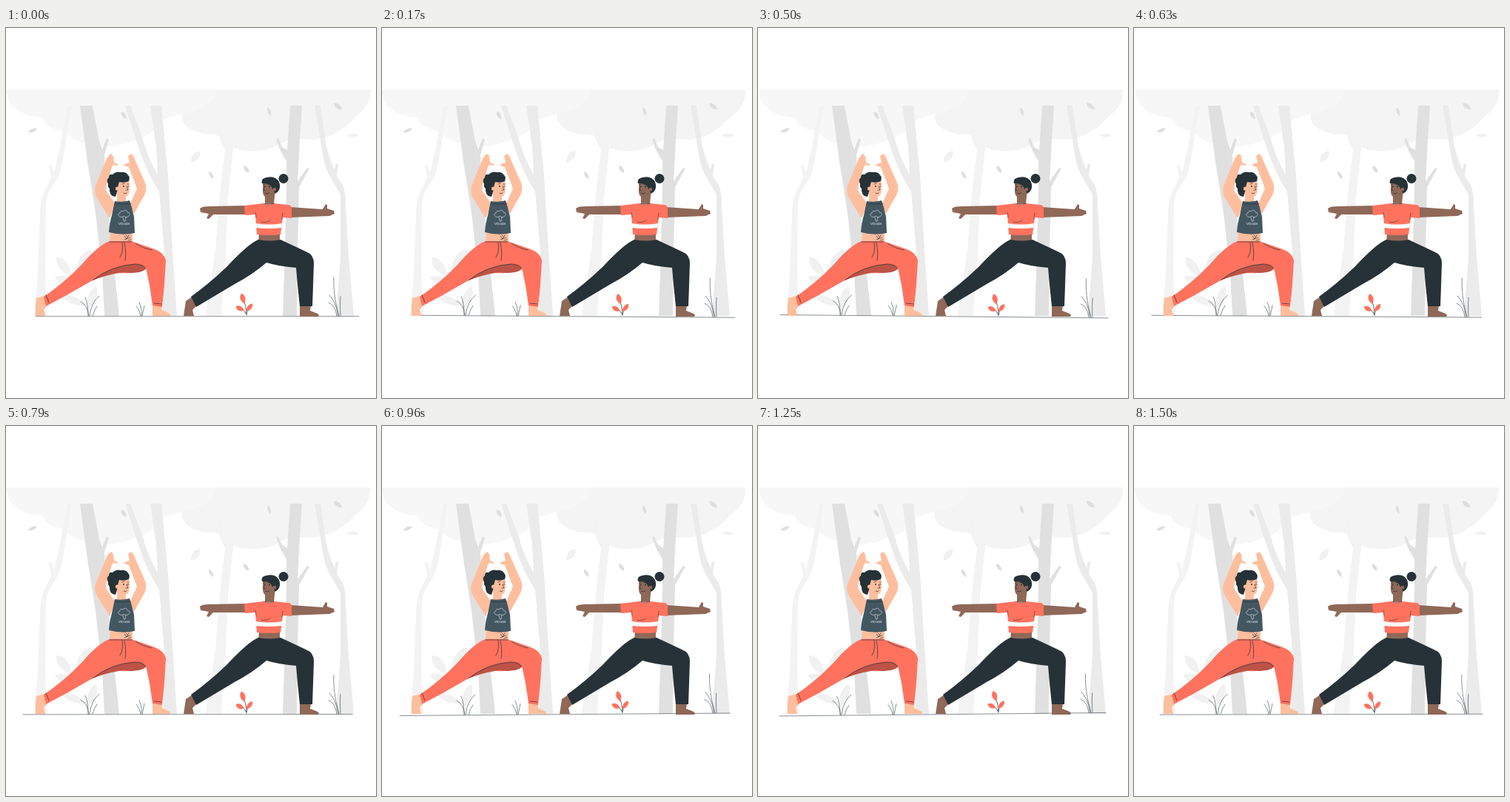
Animation, 500 px wide and 500 px high, one loop 1.54 s. Source, as an HTML page:

```html
<!DOCTYPE html>
<html lang="en">
<head>
<meta charset="utf-8">
<title>Yoga in the park</title>
<style>
html, body { margin: 0; width: 100%; height: 100%; overflow: hidden; background: #fff; }
svg { display: block; width: 100%; height: 100%; }
.ink { fill: none; stroke: #263238; stroke-width: .7; stroke-linecap: round; stroke-linejoin: round; }
.thin { stroke-width: .55; }
.dark { fill: #263238; }
.coral { fill: #ff725e; }
.fair { fill: #ffbe9d; }
.brown { fill: #8f6858; }
.t1 { fill: #e0e0e0; }
.t2 { fill: #ebebeb; }
.t3 { fill: #f3f3f3; }
</style>
</head>
<body>
<svg viewBox="0 0 500 500">
  <defs>
    <path id="leaf" d="M0-1C.95-.45.7.5 0 1C-.7.5-.95-.45 0-1Z"/>
  </defs>

  <g class="sway">
    <path fill="#f4f4f4" d="M270 83H492C493 97 487 109 473 119C466 126 461 133 451 138C435 151 412 152 395 150C380 149 374 155 364 160C345 169 313 169 301 157C294 149 290 145 278 144C257 144 238 134 237 120C237 110 247 106 258 101Z"/>
    <path fill="#f7f7f7" d="M0 83H283C286 93 273 105 257 111C242 116 219 119 210 126C203 137 191 147 172 152C151 162 119 163 104 155C90 152 83 144 76 139C61 137 51 130 49 121C35 121 19 116 12 108C4 104 1 93 0 83Z"/>
  </g>

  <g>
    <path class="t3" d="M83 105H89L79 165Q75 195 68 206Q55 223 54 237L53 330L56 389H38L43 330L46 250Q47 229 53 219L61 202L58 186L61 184L65 195L72 165Z"/>
    <path class="t1" d="M100 105H117L126 153L130 164L136 149L139 151L133 171L135 205L139 255L146 325L153 389H133L130 330L121 250L110 180Z"/>
    <path class="t2" d="M195 105H210L219 200L225 300L231 389H212L214 305L207 221Q191 197 181 167L161 105H168L184 147Q192 177 205 198L203 160Z"/>
    <path class="t3" d="M310 105H325L307 163L300 230L297 300L291 389H270L283 300L290 215L296 165L289 151L286 131L290 130L293 148L300 147Z"/>
    <path class="t1" d="M384 105H400L397 150L394 207L407 189L410 190L396 215L394 300L393 389H374L377 300L379 215L379 180L370 164L365 150L368 149L373 161L380 165Z"/>
    <path class="t2" d="M417 105H425L432 155Q437 177 444 192L446 183L449 184L447 200L455 212Q459 220 459 240L463 310L470 389H446L452 310L452 225L439 203Q431 190 428 170Z"/>
  </g>

  <g class="sway" id="leaves"></g>

  <g id="ground">
    <path id="line" class="ink thin"/>
    <path class="ink thin" d="M112 389Q110 374 101 370M111 389Q111 373 107 364M113 389Q115 371 126 362M117 389Q119 381 123 376M182 389Q180 380 176 376M183 389Q184 379 180 371M184 389Q186 381 187 375"/>
    <path class="ink thin" d="M447 389Q445 374 436 371M449 389Q446 370 437 361M452 389Q451 373 452 363"/>
    <path class="ink thin" stroke-dasharray="5 1" d="M450 389Q442 361 443 337"/>
    <path class="ink" d="M325 388Q325 375 320 365M325 387Q325 381 330 376M324 386Q322 380 315 378"/>
    <g id="sprig" class="coral"></g>
  </g>

  <!-- left figure -->
  <g>
    <path class="fair" d="M41 365L52 362L55 376L51 380L53 389H40V374ZM198 374L210 375L211 381L221 386Q223 388 222 389H198Z"/>
    <path class="fair" d="M142 170Q136 174 134 182L122 211Q118 221 122 228L140 257L148 238L134 218L143 188L145 185L151 186L151 184L146 182L145 173Z"/>
    <path class="fair" d="M169 170Q173 173 175 180L188 209Q191 218 187 226L173 251L167 239L177 217L166 188L160 186L160 184L167 182L165 173Z"/>
    <path class="fair" d="M141 274H171V291H140ZM150 219L162 225L162 236H150Z"/>
    <path class="coral" d="M140 288H169Q187 294 201 299Q214 304 216 314L214 347L211 377L198 375L194 348L189 324Q175 333 153 331Q133 334 117 341L82 361L54 376L51 363Q78 345 103 319Q124 294 140 288Z"/>
    <path fill="#bd5347" d="M117 341Q142 321 174 319Q187 319 189 326Q180 333 158 330Q137 333 117 341Z"/>
    <path class="ink" d="M117 341Q142 321 174 319Q185 319 189 325M140 289H170M157 290Q159 302 154 310M160 290Q163 304 161 314M54 361L58 371M200 372L210 373M197 300Q183 297 175 291"/>
    <path fill="#435761" d="M147 234Q157 236 167 233L169 239L173 255L174 277Q158 281 139 276Q140 263 143 253Z"/>
    <path class="ink" d="M147 237Q157 239 168 237M160 281L163 285L166 280M160 286L168 283M162 280L164 282M165 287L169 286"/>
    <g fill="none" stroke="#dfe5e7" stroke-width=".6">
      <path d="M154 255Q149 252 154 250Q154 246 158 248Q162 244 164 249Q170 250 165 255Q161 257 159 254Q156 257 154 255ZM158 255L159 261H161L162 255"/>
    </g>
    <text x="159.500" y="266" fill="#e8edef" font-family="Lato, Arial, sans-serif" font-size="4.600" text-anchor="middle">VEGAN</text>
    <path class="fair" d="M149 208L166 205L167 216L166 224Q163 230 156 227Q149 222 149 208Z"/>
    <path class="dark" d="M138 211Q135 205 139 202Q139 197 144 198Q149 193 155 195Q162 194 165 199Q168 201 166 207Q159 210 153 208Q151 213 151 218L148 228Q139 227 140 217Q137 214 138 211Z"/>
    <circle class="fair" cx="150.500" cy="217" r="2.600"/>
    <path class="ink" d="M157 211L160 210M164 211L166 211M163 214L165 219L162 219M159 223Q161 225 163 223"/>
    <g class="dark"><circle cx="159" cy="214" r=".9"/><circle cx="165" cy="214" r=".8"/></g>
  </g>

  <!-- right figure -->
  <g>
    <path class="brown" d="M243 369L252 363L257 376L252 381L254 389H240ZM397 374L412 375L411 382L421 386Q424 388 422 390H397Z"/>
    <path class="brown" d="M262 244Q264 241 275 241L324 240V252L280 252L274 258L271 257L274 251L263 249ZM384 242L428 245L432 238L434 239L434 244L443 247L444 251L437 254L384 256Z"/>
    <path class="brown" d="M342 277H370V289H341ZM350 222L364 217L362 238H350Z"/>
    <path class="dark" d="M341 286Q356 289 371 286Q388 294 405 302Q416 306 416 318L415 348L414 376H397L394 347L392 324Q368 322 352 317Q332 334 309 346L257 377L250 363Q275 345 298 323Q328 291 341 286Z"/>
    <path class="coral" d="M322 240L348 237Q355 241 362 237L382 239Q386 240 386 244V257L374 256L371 279Q355 281 339 279L337 252L323 253Z"/>
    <path fill="#fff" d="M338 264Q355 267 373 264L372 270Q355 272 338 270Z"/>
    <path class="ink thin" d="M337 249L338 256M374 250L373 258M345 262Q352 264 357 260M348 237Q355 241 362 237"/>
    <path class="brown" d="M347 207L363 205L364 219Q361 229 353 229Q348 229 347 222Z"/>
    <circle class="dark" cx="375" cy="203.500" r="6.500"/>
    <path class="dark" d="M346 210Q344 203 352 202Q364 199 369 208Q373 219 363 224Q363 219 360 217Q357 209 346 210Z"/>
    <circle class="brown" cx="363" cy="218" r="2.300"/>
    <path class="ink" d="M348 212L350 211M354 211L357 212M350 214L348 219L351 220M350 223Q353 225 356 223"/>
    <g class="dark"><circle cx="350" cy="214" r=".8"/><circle cx="356" cy="214.500" r=".9"/></g>
  </g>
</svg>
<script>
const $ = id => document.getElementById(id);
const leaf = (x, y, w, h, turn, fill = '') =>
  `<use href="#leaf" ${fill && `fill="${fill}"`} transform="translate(${x} ${y}) rotate(${turn}) scale(${w} ${h})"/>`;

const pale = '#f1f1f1', grey = '#dedede';
$('leaves').innerHTML = [
  [35.5, 138.5, 3.5, 6.5, 68, grey], [159, 118, 4, 6, -32, grey],
  [256, 174, 7, 10, 38, pale], [277, 199, 3.5, 6, -30, grey],
  [324.5, 191, 4, 6, -35, grey], [355.5, 113, 3.2, 6, -18, grey],
  [448.5, 106, 4.5, 7, -52, grey], [468, 145, 4, 8, 90, pale],
  [78, 322, 10, 16, -38, pale], [105, 316, 12, 20, 30, pale],
  [82, 342, 9, 17, -72, pale], [91, 368, 8, 18, -68, pale],
  [116, 364, 9, 16, 20, pale]
].map(a => leaf(...a)).join('');
$('sprig').innerHTML = [
  [320, 365.5, 5.5, 7, -15], [329, 377.5, 4.5, 6.5, 38], [316, 379, 5, 6, -62]
].map(a => leaf(...a)).join('');

const LOOP = 1540, STEPS = 37;
const swaying = document.querySelectorAll('.sway');
// step, left end, right end of the ground line
const ends = [[0, 40, 477], [8, 40, 477], [12, 30, 473], [14, 24, 470], [19, 23, 468],
  [23, 24, 470], [27, 24, 470], [30, 29, 470], [36, 35, 471], [37, 40, 477]];

function lineEnds(step) {
  const i = ends.findIndex(e => e[0] > step), a = ends[i - 1], b = ends[i];
  const k = (step - a[0]) / (b[0] - a[0]);
  return [1, 2].map(n => a[n] + (b[n] - a[n]) * k);
}

function draw(now) {
  const step = Math.floor((now % LOOP) / LOOP * STEPS + .1) % STEPS;
  const phase = step / STEPS * 2 * Math.PI;
  const [x1, x2] = lineEnds(step);
  $('line').setAttribute('d', `M${x1} 389.700H${x2}`);
  $('ground').setAttribute('transform', `rotate(${.63 * Math.sin(phase)} 250 389.700)`);
  const dx = .3 - 1.1 * Math.sin(2 * phase);
  swaying.forEach(g => g.setAttribute('transform', `translate(${dx} 0)`));
}

const start = performance.now();
function tick() {
  draw(performance.now() - start);
  requestAnimationFrame(tick);
}
tick();
</script>
</body>
</html>
```
